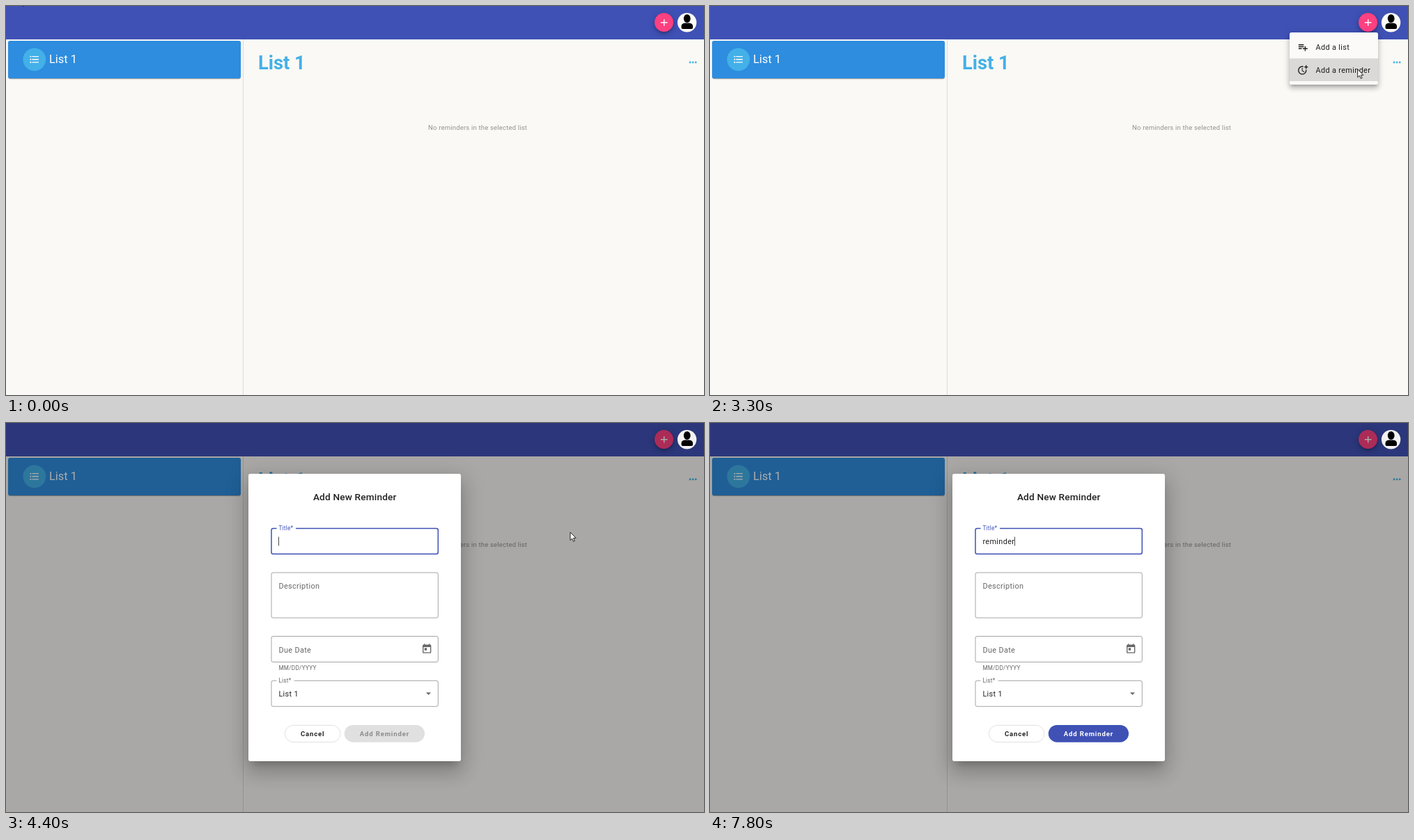
Animation of 1002x559 px, one loop 8000 ms. Source, as an HTML page:

```html
<!DOCTYPE html>
<html lang="en">
<head>
<meta charset="utf-8">
<title>Reminders</title>
<style>
html, body { margin: 0; width: 1002px; height: 559px; overflow: hidden; background: #faf9f6; }
body { position: relative; font-family: Roboto, sans-serif; }
div, svg { position: absolute; }
.layer, svg { left: 0; top: 0; width: 1002px; height: 559px; }
svg { overflow: visible; }
#card { left: 3px; top: 50px; width: 333.5px; height: 53.5px; border-radius: 2.7px; background: #2e8dde;
  box-shadow: 0 2px 1px -1px #0003, 0 .7px .7px #0002, 0 .7px 2px #0002; }
#fab { left: 931px; top: 10px; width: 27.4px; height: 27.4px; border-radius: 50%; background: #ff4081;
  box-shadow: 0 2px 3.4px -.7px #0003, 0 4px 6.8px #0002, 0 .7px 12px #0002; }
#panel { left: 832px; top: 37.5px; width: 127px; height: 75.8px; border-radius: 2.7px; background: #fbfaf8;
  box-shadow: 0 3.4px 3.4px -2px #0003, 0 5.5px 6.8px .7px #0002, 0 2px 9.5px 1.4px #0002; }
#menu { transform-origin: 945px 38px; }
#shade { background: #000; }
#dialog { transform-origin: 500.5px 279.5px; }
#sheet { left: 348px; top: 73px; width: 305.3px; height: 413px; border-radius: 2.7px; background: #fff;
  box-shadow: 0 7.5px 10.2px -4.8px #0003, 0 16.4px 25.9px 2px #00000024, 0 6.1px 31.4px 5.5px #0000001f; }
.body { font-size: 10.91px; letter-spacing: .03125em; }
.small { font-size: 8.18px; letter-spacing: .0333em; }
.label { fill: #0009; }
.button { font-size: 9.55px; font-weight: 600; letter-spacing: .0892em; text-anchor: middle; }
.field { fill: none; stroke: #00000066; stroke-width: .9; }
</style>
</head>
<body>
<div class="layer">
  <svg>
    <rect width="1002" height="48" fill="#3f51b5"/>
    <rect x="340" y="48" width="1" height="511" fill="#dcdbd9"/>
    <g fill="#43b0e8">
      <text x="362" y="90.6" font-size="27.3" font-weight="700">List 1</text>
      <circle cx="982" cy="81" r="1.4"/><circle cx="986.1" cy="81" r="1.4"/><circle cx="990.2" cy="81" r="1.4"/>
    </g>
    <text x="606" y="178" font-size="9.55" letter-spacing=".17" fill="#949391">No reminders in the selected list</text>
  </svg>
  <div id="card"></div>
  <div id="fab"></div>
  <svg>
    <circle cx="40.8" cy="76.8" r="16.4" fill="#43b0e8"/>
    <g fill="#fff">
      <path transform="translate(32.6 68.6) scale(.682)" d="M7 5h14v2H7zM7 11h14v2H7zM7 17h14v2H7zM2.5 6a1.5 1.5 0 1 0 3 0a1.5 1.5 0 1 0-3 0zM2.5 12a1.5 1.5 0 1 0 3 0a1.5 1.5 0 1 0-3 0zM2.5 18a1.5 1.5 0 1 0 3 0a1.5 1.5 0 1 0-3 0z"/>
      <text x="62" y="82.2" font-size="16.37">List 1</text>
      <circle id="ripple" cx="944.7" cy="23.7" r="0" opacity=".12"/>
      <path d="M944.7 18.9v9.6M939.9 23.7h9.6" stroke="#fff" stroke-width="1.4"/>
    </g>
  </svg>
</div>

<div class="layer" id="menu">
  <div id="panel"></div>
  <svg class="body" fill="#000000de">
    <rect id="hover" x="832" y="75.3" width="127" height="32.7" fill="#000"/>
    <path transform="translate(842.8 51) scale(.682)" d="M14 10H3v2h11zM14 6H3v2h11zM18 14v-4h-2v4h-4v2h4v4h2v-4h4v-2zM3 16h7v-2H3z"/>
    <path transform="translate(842.8 83.6) scale(.682)" d="M10 8v6l4.7 2.9.8-1.2-4-2.4V8zM17.92 12c.05.33.08.66.08 1 0 3.9-3.1 7-7 7s-7-3.1-7-7 3.1-7 7-7c.7 0 1.37.1 2 .29V4.23C12.36 4.08 11.69 4 11 4c-5 0-9 4-9 9s4 9 9 9 9-4 9-9c0-.34-.02-.67-.06-1zM20 5V2h-2v3h-3v2h3v3h2V7h3V5z"/>
    <text x="869.5" y="63">Add a list</text>
    <text x="869.5" y="95.7">Add a reminder</text>
  </svg>
</div>

<div class="layer" id="shade"></div>
<svg id="avatar">
  <circle cx="977.6" cy="23.7" r="13.7" fill="#fbfaf7"/>
  <ellipse cx="977.7" cy="18" rx="4.9" ry="6"/>
  <path d="M969.5 31v-2q0-4 5-4.5h6.500q5 .5 5 4.500v2q0 2-2 2h-12.500q-2 0-2-2z"/>
</svg>

<div class="layer" id="dialog">
  <div id="sheet"></div>
  <svg class="body" fill="#000000de">
    <text x="500.7" y="111.4" text-anchor="middle" style="font-size:13.64px;font-weight:500;letter-spacing:.0125em">Add New Reminder</text>
    <rect id="titleBox" class="field" x="381" y="151.500" width="239.300" height="36.800" rx="2.5"/>
    <rect class="field" x="381" y="215" width="239.300" height="65" rx="2.5"/>
    <rect class="field" x="381" y="306.500" width="239.300" height="37" rx="2.5"/>
    <rect class="field" x="381" y="370.300" width="239.300" height="37" rx="2.5"/>
    <g fill="#fff">
      <rect id="gap" x="388.500" y="149" width="27.500" height="5"/>
      <rect x="388.500" y="368" width="25" height="5"/>
    </g>
    <g class="label">
      <text id="titleLabel" x="391.4">Title*</text>
      <text x="391.4" y="238.3">Description</text>
      <text x="391.4" y="329.7">Due Date</text>
      <text x="391.4" y="355" class="small">MM/DD/YYYY</text>
      <text id="listLabel" x="391.4" class="small">List*</text>
      <path transform="translate(596 316.500) scale(.682)" fill-rule="evenodd" d="M19 3h-1V1h-2v2H8V1H6v2H5c-1.100 0-2 .9-2 2v14c0 1.100.9 2 2 2h14c1.100 0 2-.9 2-2V5c0-1.100-.9-2-2-2zm0 16H5V8h14zM7 10h5v5H7z"/>
      <path d="M603 387.300h7l-3.500 3.500z"/>
    </g>
    <text x="391.4" y="392.8">List 1</text>
    <text id="typed" x="391.4" y="173.700"></text>
    <rect id="caret" y="163.500" width=".8" height="13"/>
    <rect x="400.400" y="434.400" width="79.600" height="24.200" rx="12.100" fill="none" stroke="#0000001f"/>
    <text x="440.200" y="449.900" class="button">Cancel</text>
    <rect id="addBox" x="485.800" y="434" width="115.200" height="24.700" rx="12.300"/>
    <text id="addText" x="543.400" y="449.900" class="button">Add Reminder</text>
  </svg>
</div>

<svg><path id="mouse" d="M0 0V11.500L2.700 9L4.600 13.200L6.400 12.400L4.600 8.300H8.200Z" fill="#fff" stroke="#111" stroke-width=".9"/></svg>

<script>
const $ = id => document.getElementById(id);
const LOOP = 8000, STEP = 100;

// time, x, y of the pointer's tip
const path = [
  [0, 19.5, -12.5], [100, 19.5, -12.9], [200, 19.5, -40], [300, 640, -40],
  [400, 666, -6], [600, 805, 45], [800, 905, 55], [1000, 939, 38], [1100, 942.5, 34],
  [2300, 942.5, 34], [2400, 943.5, 35], [2700, 932, 86], [2800, 932, 86], [2900, 929.7, 91],
  [3500, 929.7, 91], [3700, 870, 128], [3900, 812, 158], [4300, 812, 158], [4400, 810, 157]
];
const keyTimes = [5200, 5500, 5800, 6000, 6500, 7000, 7400, 7800];

function pointer(t) {
  const next = path.findIndex(p => p[0] > t);
  if (next < 0) return path.at(-1).slice(1);
  const [t0, x0, y0] = path[next - 1], [t1, x1, y1] = path[next];
  const k = (t - t0) / (t1 - t0);
  return [x0 + (x1 - x0) * k, y0 + (y1 - y0) * k];
}

function set(id, attrs) {
  for (const name in attrs) $(id).setAttribute(name, attrs[name]);
}

function draw(t) {
  const [x, y] = pointer(t);
  set("mouse", { transform: `translate(${x} ${y})`, opacity: t < 5200 ? 1 : 0 });

  set("ripple", { r: t >= 1400 && t < 1800 ? Math.min(13.7, (t - 1300) / 15) : 0 });
  const menuIn = t < 1500 ? 0 : t < 1600 ? .75 : 1;
  $("menu").style.opacity = t < 3400 ? menuIn : t < 3500 ? .4 : 0;
  $("menu").style.transform = `scale(${.8 + .2 * menuIn})`;
  set("hover", { opacity: t === 3200 ? .07 : t === 3300 ? .135 : 0 });

  const open = t >= 3500;
  $("shade").style.opacity = t < 3400 ? 0 : t < 3500 ? .245 : t < 3600 ? .31 : .325;
  $("avatar").style.opacity = t < 3400 ? 1 : .96;
  $("dialog").style.opacity = t < 3400 ? 0 : open ? 1 : .73;
  $("dialog").style.transform = open ? "none" : "scale(.993)";

  set("titleBox", { style: open ? "stroke:#3f51b5;stroke-width:1.5" : "" });
  set("gap", { opacity: open ? 1 : 0 });
  set("titleLabel", {
    y: !open ? 175 : t < 3600 ? 155.3 : 153.5,
    class: open ? "small" : "body",
    fill: open ? "#3f51b5" : "#0009"
  });
  set("listLabel", { y: open ? 372.6 : 381 });

  const count = keyTimes.filter(k => k <= t).length;
  $("typed").textContent = "reminder".slice(0, count);
  const caretOn = open && t < 3900 || t >= 4400 && t < 5000 || count > 0;
  const width = count ? $("typed").getComputedTextLength() : 0;
  set("caret", { x: 391.2 + width, opacity: caretOn ? 1 : 0 });
  set("addBox", { fill: count ? "#3f51b5" : "#0000001f" });
  set("addText", { fill: count ? "#fff" : "#00000061" });
}

function frame() {
  draw(Math.floor(performance.now() % LOOP / STEP) * STEP);
  requestAnimationFrame(frame);
}
frame();
</script>
</body>
</html>
```
